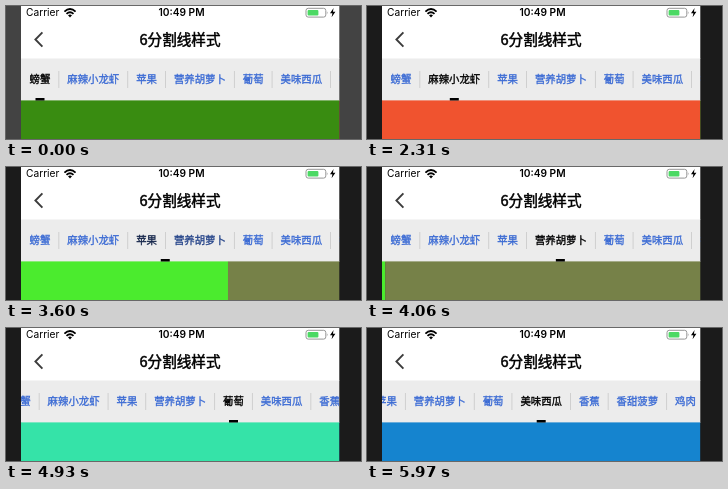
An HTML page that plays this animation: 355 px wide and 133 px high, repeating every 6450 ms.

```html
<!DOCTYPE html>
<html lang="zh-CN">
<head>
<meta charset="utf-8">
<title>Tab bar with dividers</title>
<style>
  html, body { margin: 0; width: 100%; height: 100%; overflow: hidden; background: #1b1b1b; }
  svg { display: block; width: 100vw; height: 100vh; }
  .cjk { font-family: "Noto Sans CJK SC", "Noto Sans CJK", sans-serif; font-weight: 400; }
  .status { font: 400 10.2px Inter, Roboto, sans-serif; }
  .title { font-size: 14.6px; stroke: #000; stroke-width: .5px; }
  .tab { font-size: 10.4px; stroke-width: .32px; }
</style>
</head>
<body>
<svg viewBox="0 0 355 133" preserveAspectRatio="none">
  <defs><clipPath id="screen"><rect x="15" width="318.3" height="133"/></clipPath></defs>
  <rect id="desk" width="355" height="133"/>
  <g clip-path="url(#screen)">
    <rect x="15" width="319" height="53" fill="#fff"/>
    <rect x="15" y="52.5" width="319" height="42.5" fill="#ececec"/>
    <g id="pages"></g>
    <g id="tabs"></g>

    <text class="status" x="20" y="10.4">Carrier</text>
    <g fill="none" stroke="#000" stroke-width="1.9">
      <path d="M58.4 5.6Q64 0.6 69.6 5.6"/>
      <path d="M60.5 7.9Q64 4.8 67.5 7.9"/>
    </g>
    <path d="M62 9.3Q64 7.7 66 9.3L64 11.4Z"/>
    <text class="status" x="175.5" y="10.4" text-anchor="middle" style="font-weight:600">10:49 PM</text>
    <rect x="300" y="2.3" width="19.8" height="8.8" rx="2.2" fill="#fff" stroke="#8c8c8c" stroke-width=".9"/>
    <rect x="301.6" y="3.9" width="10.8" height="5.6" rx="1" fill="#4cd964"/>
    <path d="M320.9 5.2Q322.3 6.7 320.9 8.2Z" fill="#8c8c8c"/>
    <path d="M327.6 2L324 7.2H326.4L325.6 11.2L329.4 5.8H326.9Z"/>

    <path d="M36.4 26.3L29.4 33.5L36.4 40.7" fill="none" stroke="#3c3c3c" stroke-width="1.9"/>
    <text class="cjk title" x="174" y="39" text-anchor="middle">6分割线样式</text>
  </g>
</svg>
<script>
const LOOP = 6450, LEFT = 15, WIDTH = 318.4, MID = LEFT + WIDTH / 2;
const FONT = 10.4, GAP = 16.9, TICK = 57.84;
const labels = ['螃蟹', '麻辣小龙虾', '苹果', '营养胡萝卜', '葡萄', '美味西瓜', '香蕉', '香甜菠萝', '鸡肉'];
const colors = ['#398c11', '#f0532f', '#4beb2e', '#768148', '#35e3a8', '#1584cf'];
const BLUE = [58, 106, 212], BLACK = [0, 0, 0];

// drag start, drag end, dragged share, release, settle time
const swipes = [
  [1670, 1780, .307, 1910, 390],
  [2610, 2715, .226, 2905, 390],
  [3425, 3595, .35, 3780, 375],
  [4440, 4560, .2, 4560, 350],
  [5230, 5372, .1, 5372, 340]
];
// start, end, tab brought to the middle
const scrolls = [[4170, 4470, 3], [4935, 5230, 4], [5700, 5960, 5]];
// screen refreshes run in bursts
const bursts = [1670, 1960, 2660, 2960, 3480, 3830];

const $ = id => document.getElementById(id);
const clamp = v => Math.max(0, Math.min(1, v));
const span = (t, a, b) => clamp((t - a) / (b - a));
const smooth = u => u * u * (3 - 2 * u);
const lerp = (a, b, u) => a + (b - a) * u;

function add(parent, name, attrs, text = '') {
  const el = document.createElementNS('http://www.w3.org/2000/svg', name);
  for (const k in attrs) el.setAttribute(k, attrs[k]);
  el.textContent = text;
  return parent.appendChild(el);
}

const pages = colors.map(fill => add($('pages'), 'rect', { y: 94.4, width: WIDTH + .2, height: 39, fill }));

let edge = 23.6;
const tabs = labels.map(label => {
  const width = label.length * FONT, x = edge;
  edge += width + GAP;
  const el = add($('tabs'), 'text', { x, y: 77.4, class: 'cjk tab' }, label);
  add($('tabs'), 'rect', { x: x + width + GAP / 2 - .4, y: 65, width: .8, height: 17, fill: '#c8c8c8' });
  return { el, mid: x + width / 2 };
});
const marker = add($('tabs'), 'rect', { y: 92, width: 9, height: 2.5, fill: '#000' });

function tick(t) {
  const start = bursts.filter(b => b <= t).pop();
  return start ? start + Math.floor((t - start + 12) / TICK) * TICK : t;
}

function pageAt(t) {
  return swipes.reduce((sum, [a, b, share, release, time]) => {
    const held = share * span(t, a, b);
    const rest = (1 - span(t, release, release + time)) ** 3;
    return sum + (t < release ? held : 1 - (1 - share) * rest);
  }, 0);
}

function offsetAt(t) {
  return scrolls.reduce((x, [a, b, i]) => lerp(x, tabs[i].mid - MID, smooth(span(t, a, b))), 0);
}

function draw(time) {
  const t = tick(time), pos = pageAt(t);
  $('desk').setAttribute('fill', time < 1670 ? '#434343' : '#1b1b1b');
  pages.forEach((el, i) => el.setAttribute('x', LEFT + (i - pos) * WIDTH));
  tabs.forEach(({ el }, i) => {
    const on = clamp(1 - Math.abs(i - pos));
    const color = `rgb(${BLUE.map((c, k) => Math.round(lerp(c, BLACK[k], on)))})`;
    el.setAttribute('fill', color);
    el.setAttribute('stroke', color);
  });
  const i = Math.min(Math.floor(pos), colors.length - 2);
  marker.setAttribute('x', lerp(tabs[i].mid, tabs[i + 1].mid, pos - i) - 4.5);
  $('tabs').setAttribute('transform', `translate(${-offsetAt(t)} 0)`);
}

const origin = performance.now();
function frame() {
  draw((performance.now() - origin) % LOOP);
  requestAnimationFrame(frame);
}
frame();
</script>
</body>
</html>
```
